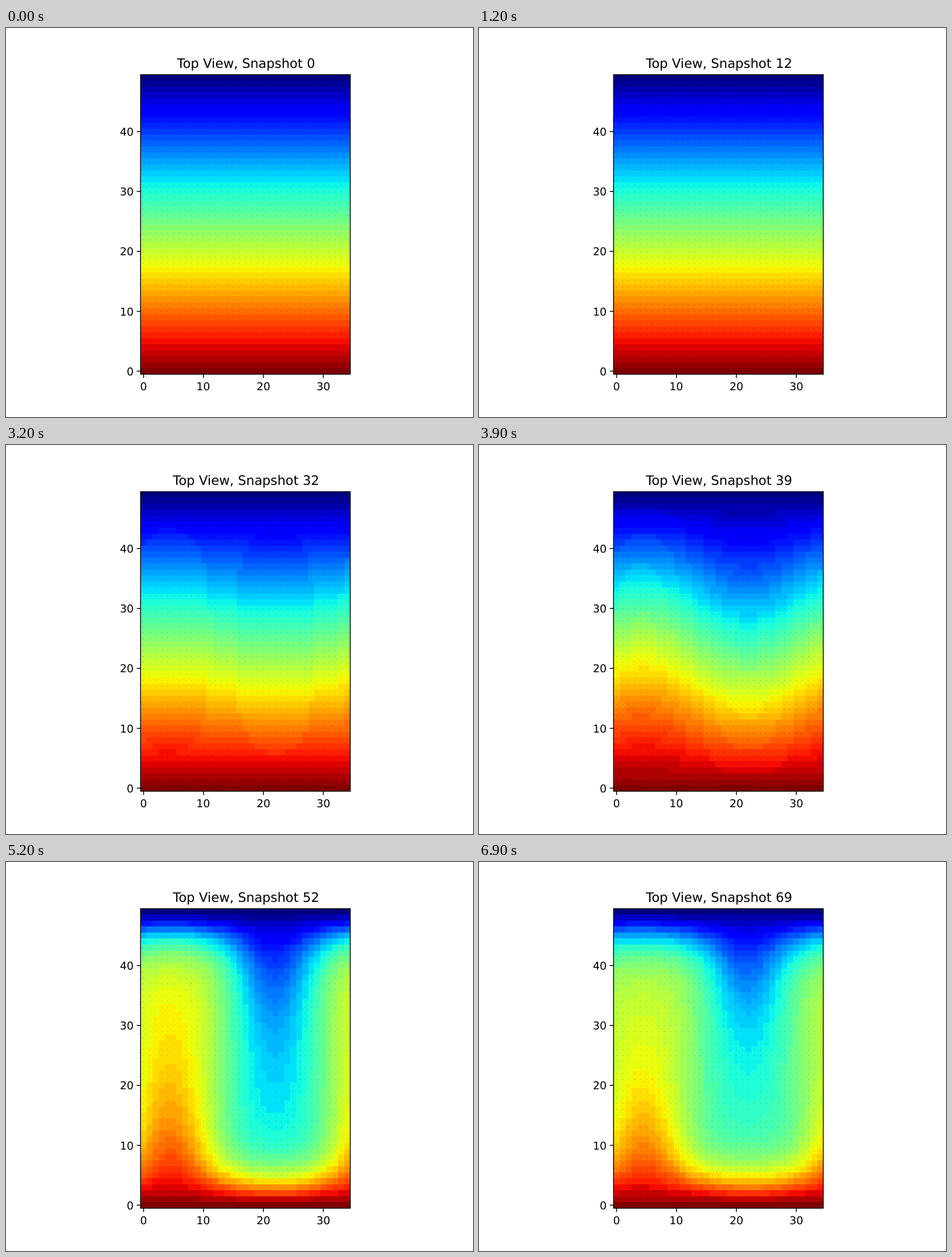
Write an HTML page with a canvas that moves like this. It is 820 px wide and 683 px high and loops after 7 s.

```html
<!DOCTYPE html>
<html lang="en">
<head>
<meta charset="utf-8">
<title>Top View</title>
<style>
html, body { margin: 0; width: 100%; height: 100%; overflow: hidden; background: #fff; }
canvas { display: block; }
</style>
</head>
<body>
<canvas id="stage" width="820" height="683"></canvas>
<script>
const ctx = document.getElementById('stage').getContext('2d');
const COLS = 35, ROWS = 50, LID = ROWS - 1;
const STEP_MS = 100, STEPS = 70;
const BOX = { left: 236.3, top: 81.96, right: 604.5, bottom: 607.87 };
const CELL = (BOX.right - BOX.left) / COLS;
const PLUME_X = 4.4;

// Still fluid: straight gradient plus the first unstable wave.
const still = wave => ({
  plume: y => 1 - y / LID + wave * Math.sin(Math.PI * y / LID),
  middle: y => 1 - y / LID
});

// Rolling fluid: a plume cooling by `fall` over `reach` rows, and thin layers at floor and lid.
function rolling(fall, reach, layer) {
  const decay = (d, width, power) => Math.exp(-Math.pow(d / width, power));
  const half = y => decay(y, 1.08 * layer, 1.45);
  return {
    plume: y => (1 - fall * (1 - Math.exp(-y / reach))) * (1 - decay(LID - y, layer, 1.32)),
    middle: y => (1 + half(y) - half(LID - y)) / 2
  };
}

// `rate` is the exponential growth (or relaxation) towards the next state.
const STATES = [
  { at: 0, rate: 0.14, ...still(0) },
  { at: 39, rate: 0.14, ...still(0.076) },
  { at: 47, rate: -0.06, ...rolling(0.4, 20, 9.8) },
  { at: 52, rate: -0.17, ...rolling(0.38, 13.5, 5) },
  { at: 69, rate: 0, ...rolling(0.43, 13, 5.3) }
];

function flowAt(step) {
  const next = STATES.findIndex((s, i) => i > 0 && s.at >= step);
  const a = STATES[next - 1], b = STATES[next];
  const w = Math.expm1(a.rate * (step - a.at)) / Math.expm1(a.rate * (b.at - a.at));
  const blend = part => y => a[part](y) + w * (b[part](y) - a[part](y));
  return { plume: blend('plume'), middle: blend('middle') };
}

const clamp = v => Math.min(1, Math.max(0, v));

// Rainbow map: dark blue, blue, cyan, yellow, red, dark red.
function jet(t) {
  const r = t < 0.89 ? clamp((t - 0.35) / 0.31) : 1 - (t - 0.89) / 0.22;
  const g = t < 0.5 ? clamp((t - 0.125) / 0.25) : clamp((0.91 - t) / 0.27);
  const b = t < 0.11 ? 0.5 + t / 0.22 : clamp((0.65 - t) / 0.31);
  return `rgb(${[r, g, b].map(c => Math.round(c * 255))})`;
}
const SHADES = Array.from({ length: ROWS }, (_, n) => jet(n / LID));

const edgeX = x => Math.round(BOX.left + x * CELL);
const edgeY = y => Math.round(BOX.bottom - y * CELL);
const centreX = x => BOX.left + (x + 0.5) * CELL;
const centreY = y => BOX.bottom - (y + 0.5) * CELL;

function drawField(step) {
  const { plume, middle } = flowAt(step);
  for (let y = 0; y < ROWS; y++) {
    // The falling cold plume mirrors the rising hot one.
    const hot = plume(y), cold = 1 - plume(LID - y), mid = middle(y);
    const mean = (hot + cold) / 2, swing = (hot - cold) / 2;
    const top = edgeY(y + 1), height = edgeY(y) - top;
    for (let x = 0; x < COLS; x++) {
      const angle = 2 * Math.PI * (x - PLUME_X) / COLS;
      const t = (mean + mid) / 2 + swing * Math.cos(angle) + (mean - mid) / 2 * Math.cos(2 * angle);
      const left = edgeX(x);
      ctx.fillStyle = SHADES[Math.round(clamp(t) * LID)];
      ctx.fillRect(left, top, edgeX(x + 1) - left, height);
    }
  }
  ctx.fillStyle = 'rgba(0,0,0,0.4)';
  for (let x = 0; x < COLS; x++)
    for (let y = 0; y < ROWS; y++)
      ctx.fillRect(Math.floor(centreX(x)), Math.floor(centreY(y)), 1, 1);
}

// Aligns by the visible ink: anchor 0.5 centres on x, 1 ends at x.
function label(text, x, y, size, anchor) {
  ctx.font = `${size}px "DejaVu Sans", sans-serif`;
  const ink = ctx.measureText(text);
  const inkLeft = -ink.actualBoundingBoxLeft, inkRight = ink.actualBoundingBoxRight;
  ctx.fillText(text, x - inkLeft - anchor * (inkRight - inkLeft), y);
}

function drawAxes(step) {
  const { left, top, right, bottom } = BOX;
  const tick = 6.64, size = 18.98;
  ctx.fillStyle = ctx.strokeStyle = '#000';
  ctx.lineWidth = 1.5;
  ctx.strokeRect(left, top, right - left, bottom - top);
  ctx.beginPath();
  for (let n = 0; n < ROWS; n += 10) {
    const y = centreY(n);
    ctx.moveTo(left, y);
    ctx.lineTo(left - tick, y);
    label(n, left - 2 * tick, y + 7.2, size, 1);
    if (n >= COLS) continue;
    const x = centreX(n);
    ctx.moveTo(x, bottom);
    ctx.lineTo(x, bottom + tick);
    label(n, x, bottom + 28, size, 0.5);
  }
  ctx.stroke();
  label(`Top View, Snapshot ${step}`, (left + right) / 2 - 0.15, 70.4, 22.78, 0.5);
}

ctx.textRendering = 'geometricPrecision';
let shown = -1;
const start = performance.now();
function frame() {
  const step = Math.floor((performance.now() - start) / STEP_MS) % STEPS;
  if (step !== shown) {
    shown = step;
    ctx.fillStyle = '#fff';
    ctx.fillRect(0, 0, 820, 683);
    drawField(step);
    drawAxes(step);
  }
  requestAnimationFrame(frame);
}
frame();
</script>
</body>
</html>
```
